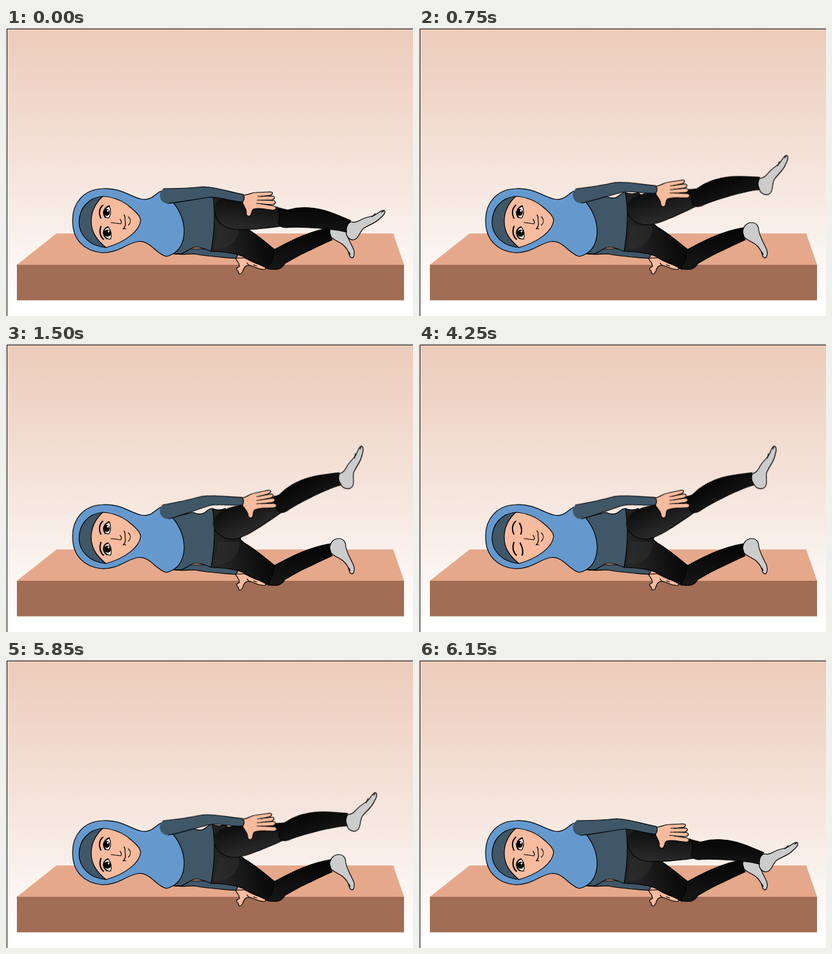
These frames come from a looping animation (635 by 450 pixels, 7550 ms). An HTML page:

```html
<!DOCTYPE html>
<html lang="en">
<head>
<meta charset="utf-8">
<title>Side-lying leg raise</title>
<style>
html, body { margin: 0; width: 100%; height: 100%; overflow: hidden; background: #fff; }
svg { display: block; width: 635px; height: 450px; }
.ink { stroke: #000; stroke-width: 1.2; stroke-linejoin: round; stroke-linecap: round; }
.bold { stroke-width: 2; }
.line { fill: none; }
.skin { fill: #f8bb9e; }
.shirt { fill: #405768; }
.scarf { fill: #6599ce; }
.sock { fill: #ccc; }

/* Each limb turns about its own joint, in held 50 ms steps. */
.limb { animation: raise 7550ms infinite; }
.thigh { --turn: -28deg; transform-origin: 336px 286px; }
.calf { --turn: -2deg; transform-origin: 433px 297px; }
.foot { --turn: -3deg; transform-origin: 535px 310px; }
.arm { --turn: -9.7deg; transform-origin: 248px 262px; }
@keyframes raise {
  0% { transform: rotate(0deg); }
  6.62% { transform: rotate(0deg); animation-timing-function: steps(9, start); }
  12.58% { transform: rotate(var(--turn)); }
  75.49% { transform: rotate(var(--turn)); animation-timing-function: steps(10, start); }
  82.11%, 100% { transform: rotate(0deg); }
}

.open { animation: blink 7550ms step-end infinite; }
.shut { opacity: 0; animation: lids 7550ms step-end infinite; }
@keyframes blink {
  0%, 19.86%, 58.27%, 100% { opacity: 1; }
  17.88%, 56.29% { opacity: 0; }
}
@keyframes lids {
  0%, 19.86%, 58.27%, 100% { opacity: 0; }
  17.88%, 56.29% { opacity: 1; }
}
</style>
</head>
<body>
<svg viewBox="0 0 635 450" width="635" height="450">
  <defs>
    <linearGradient id="wall" x1="0" y1="0" x2="0" y2="1">
      <stop offset="0" stop-color="#eccbb9"/>
      <stop offset=".55" stop-color="#f6e7df"/>
      <stop offset=".97" stop-color="#fff"/>
    </linearGradient>
    <linearGradient id="thighTone" x1=".3" y1="1" x2=".55" y2="0">
      <stop offset="0" stop-color="#2c2c2c"/>
      <stop offset="1" stop-color="#0a0a0a"/>
    </linearGradient>
    <linearGradient id="calfTone" x1=".4" y1="1" x2=".5" y2="0">
      <stop offset="0" stop-color="#161616"/>
      <stop offset="1" stop-color="#050505"/>
    </linearGradient>
    <linearGradient id="hipTone" gradientUnits="userSpaceOnUse" x1="335" y1="340" x2="400" y2="325">
      <stop offset="0" stop-color="#252525"/>
      <stop offset="1" stop-color="#0b0b0b"/>
    </linearGradient>
  </defs>

  <rect x="1" y="1" width="634" height="449" fill="url(#wall)"/>
  <path d="M1 1H635V2H2V450H1Z"/>

  <!-- bench -->
  <path d="M79 321H604L621 370H17Z" fill="#e5a88b"/>
  <path d="M17 370H621V425.500H17Z" fill="#a16d55"/>

  <!-- lower arm -->
  <path class="ink skin" d="M358 360C361 365 365 368 364 373C361 374 358 376 361 378.500C364 379 361 384 365 384.500C370 384 369 378 372 374C376 370 378 370 384 372C391 375 400 378 404 377C407 375 405 372 401 371C390 369 381 364 372 359Z"/>
  <path class="ink line" d="M376 367L379 371M386 370L391 372"/>
  <path class="ink shirt" d="M257 352C270 355 280 353 294 353C315 357 336 358 357 360C362 358 363 353 358 350L310 345L280 345Z"/>

  <!-- torso -->
  <path class="shirt" d="M250 270C270 270 285 264 292 263C298 266 306 267 312 262C316 258 319 257 322 257C327 286 325 320 320 349C310 345 301 341 292 343C284 346 280 352 272 353L257 352L246 320Z"/>
  <path class="ink line" d="M250 270C270 270 285 264 292 263C298 266 306 267 312 262C316 258 319 257 322 257M320 349C310 345 301 341 292 343C284 346 280 352 272 353L257 352"/>

  <!-- hips and lower leg -->
  <path class="ink sock" d="M505 319C506 309 512 304 519 304C526 304 530 309 530 316C532 327 537 334 540 341C544 348 544 354 542 358C540 360 537 359 536 356C535 350 531 343 525 338C519 333 511 332 507 326Z"/>
  <path class="ink line" d="M535 350L537 354"/>
  <path class="ink" fill="url(#hipTone)" d="M322 257C329 260 335 260 342 257L366 280L366 306L372 311C388 320 404 334 419 346L424 365L410 377C397 370 384 364 374 359C360 351 340 350 320 349C325 320 327 286 322 257Z"/>
  <path d="M332 309H364C366 330 348 346 324 346Z" fill="#2e2e2e" opacity=".6"/>
  <path class="ink" fill="url(#calfTone)" d="M419 346C440 335 470 318 506 312C503 319 505 325 509 331C493 338 479 345 465 351.500C452 358 442 364 435 368C432 374 426 378 418 377C409 378 407 374 412 369C417 363 416 353 419 346Z"/>

  <!-- raised leg -->
  <g class="limb thigh">
    <path fill="url(#thighTone)" d="M325 285C324 272 336 262 358 265C380 269 405 279 424 280L440 284L437 309C410 312 385 316 362 315C340 315 327 302 325 285Z"/>
    <path class="ink line" d="M358 265C380 269 405 279 424 280M437 309C410 312 385 316 362 315C340 315 327 302 325 285"/>
    <g class="limb calf">
      <g class="limb foot">
        <path class="ink sock" d="M531 319C530 311 533 303 540 303C545 305 549 302 553 300C560 296 568 295 574 293C580 290 586 284 590 285C593 288 589 293 584 297C577 305 565 308 558 313C552 318 551 327 545 330C537 334 530 325 531 319Z"/>
        <path class="ink line" d="M571 295L576 290M586 288L589 286"/>
      </g>
      <path class="ink" fill="url(#calfTone)" d="M425 283C432 284 436 286 441 284C452 281 463 280 475 281C495 282 515 291 538 301C533 306 530 312 531 319C515 315 494 313 474 312C457 311 445 311 437 312C430 312 427 309 425 305C427 297 427 290 425 283Z"/>
    </g>
  </g>

  <!-- head -->
  <path class="ink scarf" d="M104 302C103 274 121 252 151 251C179 249 194 264 212 267.500C226 270 232 260 241 255L254 265C270 281 278 298 278 319C277 340 267 353 250 357C234 353 225 332 207 333.500C189 335 177 352 149 351C121 348 104 330 104 302Z"/>
  <path class="ink shirt" d="M151 263C128 265 114 282 114 304C114 323 130 341 156 343L165 300Z"/>
  <path class="ink skin" d="M151 263C170 264 185 272 195 281C205 289 210 295 210 301C208 318 185 335 156 343C140 330 133 318 133 302C133 288 138 275 151 263Z"/>
  <path class="ink line bold" d="M151 277C146 281 144 289 148 297M148 310C145 318 147 326 152 330"/>
  <g class="ink line">
    <path d="M164 304L179 306C181 305 180 301 178 299"/>
    <path d="M184 292C187 294 185 297 186 302C187 307 186 311 183 314M183 313L187 314M191 295C195 299 195 304 191 308"/>
  </g>
  <g class="open">
    <path class="ink" fill="#fff" d="M161 278C164 283 164 292 160 297C155 297 152 293 152 288C153 283 156 280 161 278Z"/>
    <path class="ink" fill="#fff" d="M159 311C163 314 166 323 163 330C157 330 152 326 152 320C152 315 155 312 159 311Z"/>
    <ellipse cx="157" cy="288" rx="4.800" ry="5.600"/>
    <ellipse cx="158.500" cy="320.500" rx="5.200" ry="5.600"/>
    <circle cx="159" cy="285.500" r="1.400" fill="#fff"/>
    <circle cx="160" cy="318" r="1.400" fill="#fff"/>
    <path class="ink line bold" d="M161 278C153 281 150 289 155 296M159 311C152 313 150 323 157 329"/>
  </g>
  <path class="shut ink line bold" d="M157 280C160 285 161 291 159 297M158 311C161 317 163 324 161 330"/>

  <!-- upper arm and hand -->
  <g class="limb arm">
    <path class="ink skin" d="M369 261C377 262 382 257 390 257L412 256C417 256 417 260 412 261.500L398 263L415 262.500C420 263 420 267 415 268.500L399 269L417 269.500C422 271 421 275 416 276L399 275L418 278C423 280 422 284 417 284.500C407 284 395 280 386 283C382 286 384 292 380 294C376 295 374 291 375 287C374 281 371 278 369 273Z"/>
    <path class="ink line" d="M393 263H400M392 269H400M391 274L400 275"/>
    <path class="shirt" d="M246 251C270 251 290 250 308 248C325 248 345 255 370 260Q374 266 369 272C355 271 340 266 322 264C295 267 275 272 252 274C238 273 237 256 246 251Z"/>
    <path class="ink line" d="M246 251C270 251 290 250 308 248C325 248 345 255 370 260Q374 266 369 272C355 271 340 266 322 264C295 267 275 272 252 274"/>
  </g>
</svg>
</body>
</html>
```
